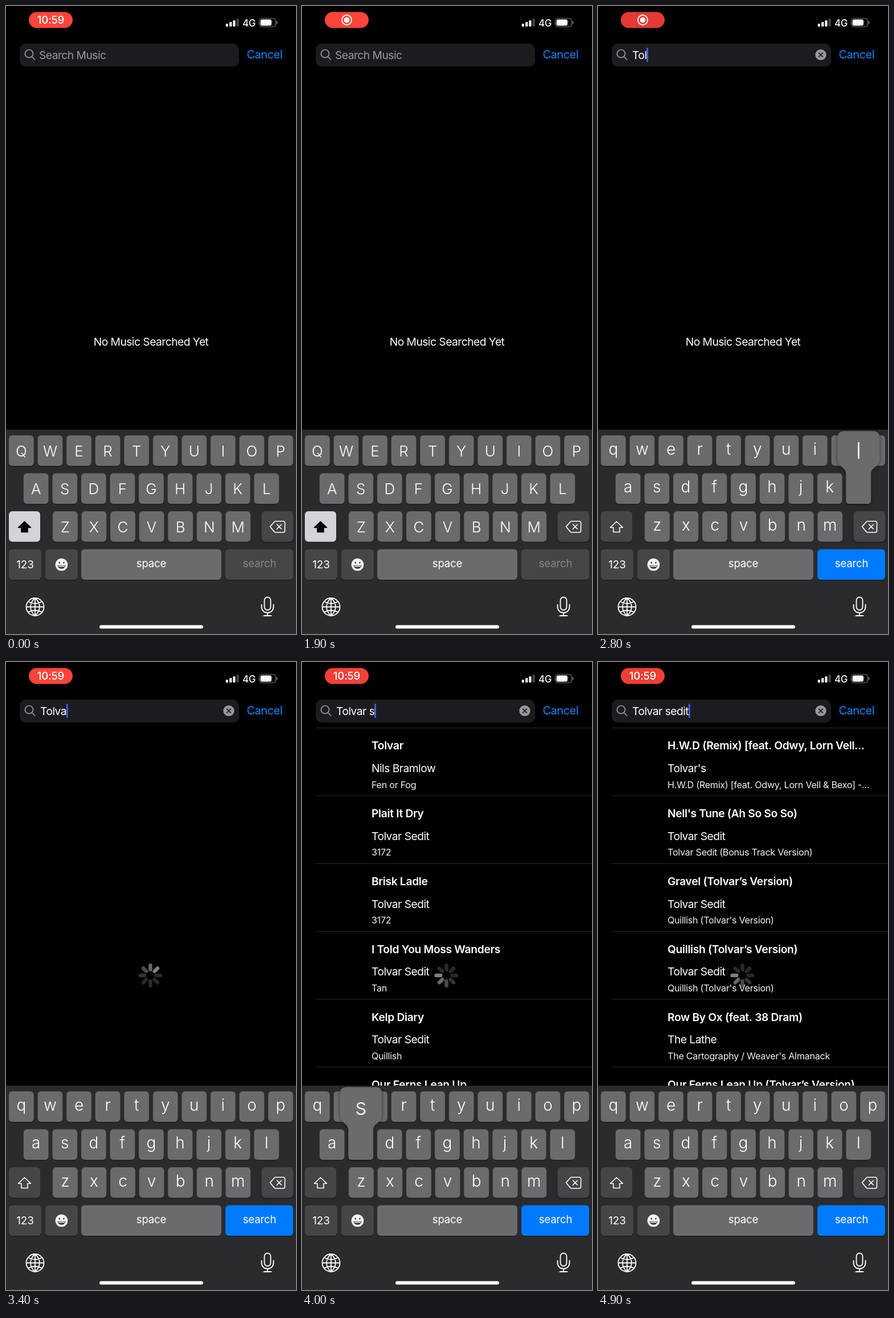
Animation of 509x1100 px, one loop 5000 ms. Source, as an HTML page with a canvas:

```html
<!DOCTYPE html>
<html lang="en">
<head>
<meta charset="utf-8">
<title>Music search</title>
<style>
html, body { margin: 0; width: 100%; height: 100%; overflow: hidden; background: #000; }
canvas { display: block; }
</style>
</head>
<body>
<canvas id="stage" width="509" height="1100"></canvas>
<script>
const c = document.getElementById('stage').getContext('2d');
const LOOP = 5000, POPUP = 150, KEYBOARD_TOP = 742, KEY_W = 43.8, KEY_H = 53.5, PITCH = 50.57;
const GREY = '#98979d', KEY = '#6b6a6d', DARK_KEY = '#464548';

// Typed characters and the moment each key goes down
const strokes = [
  [1920, 'T'], [2500, 'o'], [2750, 'l'], [2980, 'v'], [3200, 'a'], [3500, 'r'],
  [3700, ' '], [3930, 's'], [4150, 'e'], [4340, 'd'], [4570, 'i'], [4740, 't']
];

const firstResults = [
  ['Tolvar', 'Nils Bramlow', 'Fen or Fog'],
  ['Plait It Dry', 'Tolvar Sedit', '3172'],
  ['Brisk Ladle', 'Tolvar Sedit', '3172'],
  ['I Told You Moss Wanders', 'Tolvar Sedit', 'Tan'],
  ['Kelp Diary', 'Tolvar Sedit', 'Quillish'],
  ['Our Ferns Lean Up', '', '']
];
const nextResults = [
  ['H.W.D (Remix) [feat. Odwy, Lorn Vell...', "Tolvar's", 'H.W.D (Remix) [feat. Odwy, Lorn Vell & Bexo] -...'],
  ["Nell's Tune (Ah So So So)", 'Tolvar Sedit', 'Tolvar Sedit (Bonus Track Version)'],
  ['Gravel (Tolvar’s Version)', 'Tolvar Sedit', "Quillish (Tolvar's Version)"],
  ['Quillish (Tolvar’s Version)', 'Tolvar Sedit', "Quillish (Tolvar's Version)"],
  ['Row By Ox (feat. 38 Dram)', 'The Lathe', "The Cartography / Weaver's Almanack"],
  ['Our Ferns Lean Up (Tolvar’s Version)', '', '']
];

function text(s, x, y, size = 19.3, color = '#fff', { weight = 400, align = 'left', spacing = -0.55 } = {}) {
  c.font = `${weight} ${size}px Inter, sans-serif`;
  c.letterSpacing = spacing + 'px';
  c.textAlign = align;
  c.fillStyle = color;
  c.fillText(s, x, y);
  return c.measureText(s).width;
}

function box(x, y, w, h, r, color) {
  c.beginPath();
  c.roundRect(x, y, w, h, r);
  c.fillStyle = color;
  c.fill();
}

function disc(x, y, r, color) {
  c.beginPath();
  c.arc(x, y, r, 0, 7);
  c.fillStyle = color;
  c.fill();
}

function line(path, color = '#fff', width = 1.8) {
  c.strokeStyle = color;
  c.lineWidth = width;
  c.lineCap = c.lineJoin = 'round';
  c.stroke(new Path2D(path));
}

function statusBar(t) {
  const glow = (1 + Math.cos(t / 1800 * 2 * Math.PI)) / 2;
  box(40, 10.5, 77, 28, 14, `rgb(${226 + 29 * glow}, ${58 + 11 * glow}, ${50 + 8 * glow})`);
  const fade = at => Math.min(1, Math.max(0, (t - at) / 200));
  const rec = fade(600) - fade(2900);
  c.globalAlpha = 1 - rec;
  text('10:59', 78.5, 31.3, 18.8, '#fff', { weight: 500, align: 'center', spacing: -0.3 });
  c.globalAlpha = rec;
  disc(78.5, 24.5, 4.8, '#fff');
  line('M70 24.5a8.5 8.5 0 1 0 17 0a8.5 8.5 0 1 0-17 0');
  c.globalAlpha = 1;

  for (let i = 0; i < 4; i++) {
    const h = 5 + i * 3;
    box(385.8 + i * 6.3, 36 - h, 4.2, h, 1.2, i < 3 ? '#fff' : '#454547');
  }
  text('4G', 415, 35.5, 17, '#fff', { weight: 500, spacing: -0.4 });
  line('M449 21.5h20a4.5 4.5 0 0 1 4.5 4.5v6a4.5 4.5 0 0 1-4.5 4.5h-20a4.5 4.5 0 0 1-4.5-4.5v-6a4.5 4.5 0 0 1 4.5-4.5', '#777', 1.2);
  box(446.5, 23.5, 19.5, 11, 3, '#fff');
  box(474.7, 26.5, 1.7, 5, 1, '#777');
}

function searchBar(t, typed) {
  box(24, 66, 385, 40, 11, '#1c1b1f');
  line('M33.5 83.5a7 7 0 1 0 14 0a7 7 0 1 0-14 0M45.8 89l4.7 5', GREY, 1.7);
  text('Cancel', 422.5, 92, 20, '#1786ff', { spacing: -0.5 });
  let caret = 57.5;
  if (typed) {
    caret = 60 + text(typed, 60, 93);
    disc(391, 85.5, 9.6, GREY);
    line('M387.7 82.2l6.6 6.6m0-6.6l-6.6 6.6', '#1c1b1f', 1.8);
  } else {
    text('Search Music', 58, 93, 19.3, GREY);
  }
  const blink = t % 1000;
  if (typed || (blink >= 100 && blink < 600)) box(caret, 73, 2.5, 25, 1, '#3d6df2');
}

function results(rows) {
  rows.forEach(([title, artist, album], i) => {
    const y = 115.5 + i * 118.8;
    box(24, y - 0.5, 485, 1, 0, '#2b2b2d');
    text(title, 122, y + 37.8, 19.3, '#fff', { weight: 600, spacing: -0.35 });
    text(artist, 122, y + 77.4);
    text(album, 122, y + 105, 16.2, '#f2f2f2', { spacing: -0.3 });
  });
}

function spinner(t) {
  const head = Math.round(t / 120 + 4.9);
  for (let i = 0; i < 8; i++) {
    const age = ((head - i) % 8 + 8) % 8;
    c.save();
    c.translate(253.5, 549);
    c.rotate(i * Math.PI / 4);
    box(-3.2, -21, 6.4, 14, 3.2, `rgba(150, 150, 154, ${Math.max(0.28, 0.85 - age * 0.17)})`);
    c.restore();
  }
}

function key(x, y, w, color) {
  box(x, y + 1.3, w, KEY_H, 6, '#19181a');
  box(x, y, w, KEY_H, 6, color);
}

function popup(x, y, letter) {
  const top = y - 74, l = x - 15, r = x + 59, end = x + KEY_W, bottom = y + KEY_H;
  const shape = new Path2D(`M${l + 12} ${top}H${r - 12}Q${r} ${top} ${r} ${top + 12}V${top + 50}
    C${r} ${top + 64} ${end} ${top + 62} ${end} ${top + 76}V${bottom - 6}Q${end} ${bottom} ${end - 6} ${bottom}
    H${x + 6}Q${x} ${bottom} ${x} ${bottom - 6}V${top + 76}C${x} ${top + 62} ${l} ${top + 64} ${l} ${top + 50}
    V${top + 12}Q${l} ${top} ${l + 12} ${top}`);
  c.save();
  c.shadowColor = '#0008';
  c.shadowBlur = 5;
  c.fillStyle = KEY;
  c.fill(shape);
  c.restore();
  text(letter, x + 22, top + 48, 40, '#fff', { weight: 350, align: 'center', spacing: 0 });
}

function keyboard(upper, active, pressed) {
  box(0, KEYBOARD_TOP, 509, 358, 0, '#2b2a2c');
  let pop;
  [['qwertyuiop', 5], ['asdfghjkl', 30.8], ['zxcvbnm', 82]].forEach(([row, left], r) => {
    [...row].forEach((ch, i) => {
      const x = left + i * PITCH, y = 752 + r * 66.5;
      const label = upper ? ch.toUpperCase() : ch;
      key(x, y, KEY_W, KEY);
      if (label === pressed) pop = [x, y, label];
      else text(label, x + KEY_W / 2, y + (upper ? 36.5 : 33.5), upper ? 26 : 28, '#fff', { weight: 350, align: 'center', spacing: 0 });
    });
  });

  key(5, 885, 55, upper ? '#d5d3d8' : DARK_KEY);
  const arrow = 'M32.5 903L43.5 913.5H38V921.5H27V913.5H21.5Z';
  if (upper) {
    c.fillStyle = '#000';
    c.fill(new Path2D(arrow));
  }
  line(arrow, upper ? '#000' : '#fff', 1.6);
  key(449, 885, 55, DARK_KEY);
  line('M463.5 912l7.5-8.5q1-1 2.5-1h13q3 0 3 3v13.5q0 3-3 3h-13q-1.5 0-2.5-1zM475.5 908l8 8m0-8l-8 8', '#fff', 1.6);

  const mid = { align: 'center', spacing: -0.2 };
  key(5, 951.5, 57, DARK_KEY);
  text('123', 33.5, 985, 19, '#fff', mid);
  key(69, 951.5, 57, DARK_KEY);
  disc(97.5, 978.5, 10.8, '#fff');
  disc(93.7, 975, 1.6, DARK_KEY);
  disc(101.3, 975, 1.6, DARK_KEY);
  c.fill(new Path2D('M90.5 979.5h14q-1 6.5-7 6.5t-7-6.5'));
  line('M92.5 981.3h10', '#fff', 1.4);
  key(132, 951.5, 246, pressed === ' ' ? DARK_KEY : KEY);
  text('space', 255, 983, 18.7, '#fff', mid);
  key(385, 951.5, 119, active ? '#007aff' : DARK_KEY);
  text('search', 445, 983, 18.7, active ? '#fff' : '#858487', mid);

  line(`M35.5 1052.5a15.5 15.5 0 1 0 31 0a15.5 15.5 0 1 0-31 0h31M51 1037v31
    M51 1037c-10.5 9-10.5 22 0 31c10.5-9 10.5-22 0-31M39 1043.5q12 6 24 0M39 1061.5q12-6 24 0`);
  line(`M453.5 1041a5.5 5.5 0 0 1 11 0v11.5a5.5 5.5 0 0 1-11 0z
    M448.5 1048.5v4a10.5 10.5 0 0 0 21 0v-4M459 1063v5M452.5 1068h13`);
  box(164, 1084.5, 182, 6, 3, '#fff');
  if (pop) popup(...pop);
}

function draw(t) {
  const done = strokes.filter(([at]) => t >= at);
  const typed = done.map(([, ch]) => ch).join('');
  const last = done[done.length - 1];
  const pressed = last && t < last[0] + POPUP ? last[1] : '';

  box(0, 0, 509, 1100, 0, '#000');
  statusBar(t);
  searchBar(t, typed);
  if (t >= 3750) results(t < 4280 ? firstResults : nextResults);
  if (t >= 3200) spinner(t);
  else text('No Music Searched Yet', 254.5, 595, 19.3, '#fff', { align: 'center' });
  keyboard(!typed || pressed === 'T', !!typed, pressed);
}

const start = performance.now();
function tick() {
  draw((performance.now() - start) % LOOP);
  requestAnimationFrame(tick);
}
tick();
</script>
</body>
</html>
```
